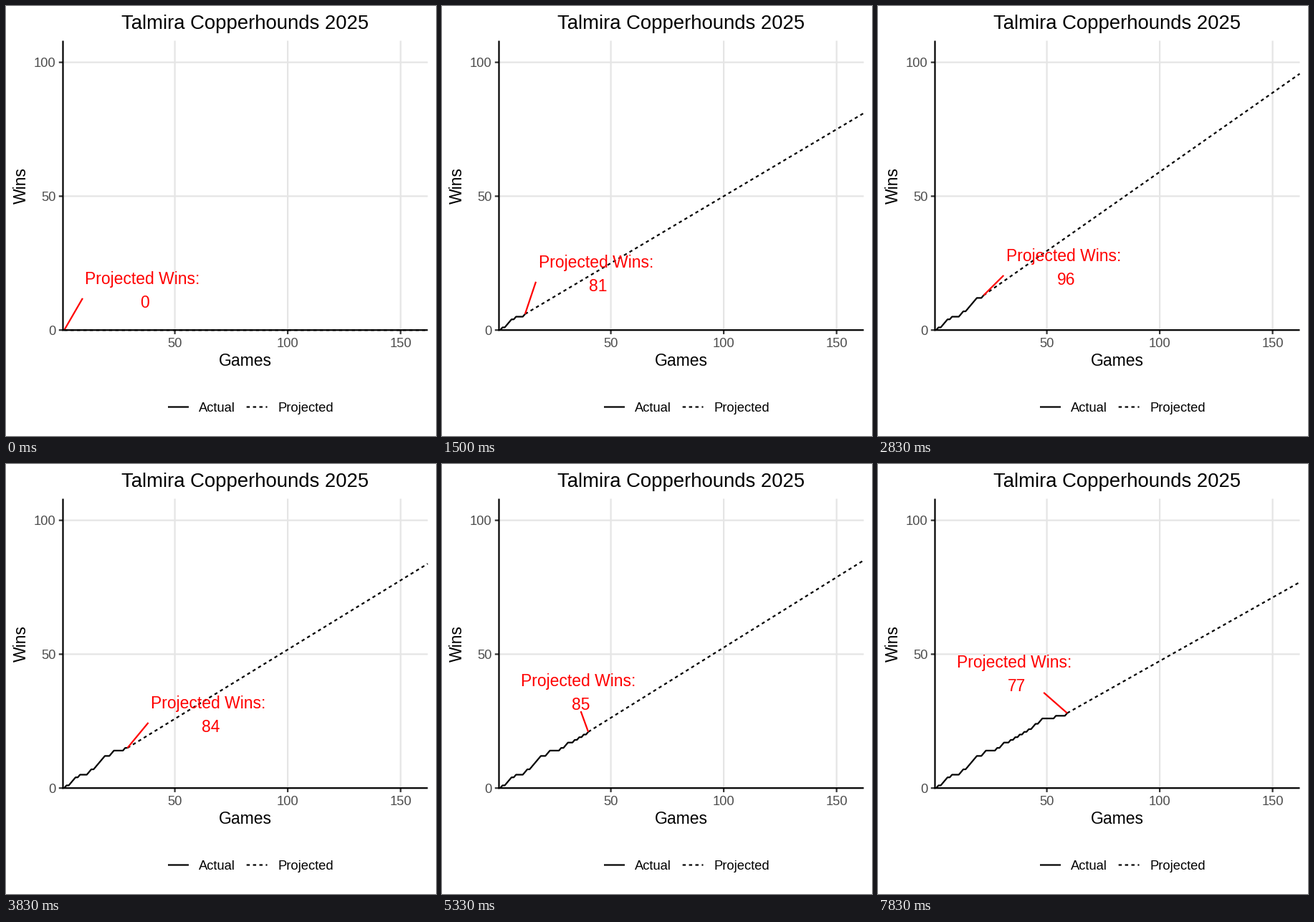
Recreate the animation shown at these times as a matplotlib script. Size 600 by 600 pixels, loop 8 s.

```python
import matplotlib.pyplot as plt
import numpy as np
from matplotlib.animation import FuncAnimation

STEPS, LOOP = 48, 8000
TICK = 25  # ms, fine enough for steps of 170, 160 and 170 ms
SEASON, LAST = 162, 59
LW = 1.07
DASH = (0, (2, 2))
GREY = "#4D4D4D"

plt.rcParams["font.family"] = "Liberation Sans"

# One letter per game played, wins accumulate from it
RESULTS = ("LWLWWWLWLLLWWLWWWWWLLWWLLLLWLWWLLWLWLWLWLWLWWLWW"
           "LLLLLWLLLLW")
wins = np.cumsum([r == "W" for r in RESULTS])
games = np.arange(1, LAST + 1)

LEFT, RIGHT, TOP, BASE = 79.5, 588.5, 48.5, 452.2


def px(game):
    return 235.6 + 3.15 * (game - 50)


def py(win):
    return BASE - 3.736 * win


fig = plt.figure(figsize=(4, 4), dpi=150, facecolor="white")
ax = fig.add_axes([0, 0, 1, 1])
ax.set_xlim(0, 600)
ax.set_ylim(600, 0)
ax.axis("off")


def line(xs, ys, color="black", z=3, **kw):
    return ax.plot(xs, ys, color=color, lw=LW, zorder=z, snap=False,
                   solid_capstyle="butt", dash_capstyle="butt", **kw)[0]


def text(x, y, s, size=8.8, color="black", ha="center", **kw):
    return ax.text(x, y, s, fontsize=size, color=color, ha=ha,
                   va="baseline", zorder=6, **kw)


# Grid, ticks and axes
for g in (50, 100, 150):
    line([px(g)] * 2, [TOP, BASE], "#E5E5E5", 1)
    line([px(g)] * 2, [BASE, BASE + 5.7], "#333333", 2)
    text(px(g), 476, str(g), color=GREY)
for w in (0, 50, 100):
    if w:
        line([LEFT, RIGHT], [py(w)] * 2, "#E5E5E5", 1)
    line([LEFT - 5.7, LEFT], [py(w)] * 2, "#333333", 2)
    text(69.5, py(w) + 6.6, str(w), color=GREY, ha="right")
line([LEFT, LEFT], [TOP, BASE + 1], z=5)
line([LEFT - 1, RIGHT], [BASE, BASE], z=5)

text(334, 32, "Talmira Copperhounds 2025", 13.2)
text(334, 502, "Games", 11)
text(28, 250.3, "Wins", 11, rotation=90, rotation_mode="anchor")

# Legend
line([226, 255], [559.5, 559.5])
text(269, 566, "Actual", ha="left")
line([335.7, 364.5], [559.5, 559.5], ls=DASH)
text(379.4, 566, "Projected", ha="left")

actual = line([], [])
projected = line([], [], ls=DASH)
pointer = line([], [], "red", 4)
head = text(0, 0, "Projected Wins:", 11, "red")
count = text(0, 0, "", 11, "red")

panel = plt.Rectangle((LEFT, TOP), RIGHT - LEFT, BASE - TOP + 2,
                      transform=ax.transData)
for artist in (actual, projected):
    artist.set_clip_path(panel)


def label_spot(i, x, y):
    """Centre of the label and the near end of its pointer."""
    if i < 29:
        keys = (0, 9, 17, 23, 28)
        cx = x + np.interp(i, keys, (109.4, 98.8, 111.6, 112.8, 112))
        cy = y + np.interp(i, keys, (-55.7, -56.3, -39, -46.5, -51))
        return cx, cy, cx - 83.7, cy + 11.3
    cx, cy = 190.2, y - 55.5
    ex = cx + np.interp(x - cx, (4, 14, 51.5, 73.5), (1, 3.5, 22, 41))
    return cx, cy, ex, cy + 26.8


def draw(tick):
    # A step begins on the tick at or just before its exact time
    i = (tick * TICK + TICK - 1) * STEPS // LOOP
    n = round(1 + i * (LAST - 1) / (STEPS - 1))
    won = wins[n - 1]
    total = won / n * SEASON
    x, y = px(n), py(won)
    actual.set_data(px(games[:n]), py(wins[:n]))
    projected.set_data([x, px(SEASON)], [y, py(total)])
    cx, cy, ex, ey = label_spot(i, x, y)
    pointer.set_data([x, ex], [y, ey])
    head.set_position((cx, cy - 8.5))
    count.set_position((cx + 3.2, cy + 24.5))
    count.set_text(str(round(total)))
    return actual, projected, pointer, head, count


anim = FuncAnimation(fig, draw, frames=LOOP // TICK, interval=TICK,
                     init_func=lambda: draw(0), repeat=True, repeat_delay=0)
plt.show()
```
